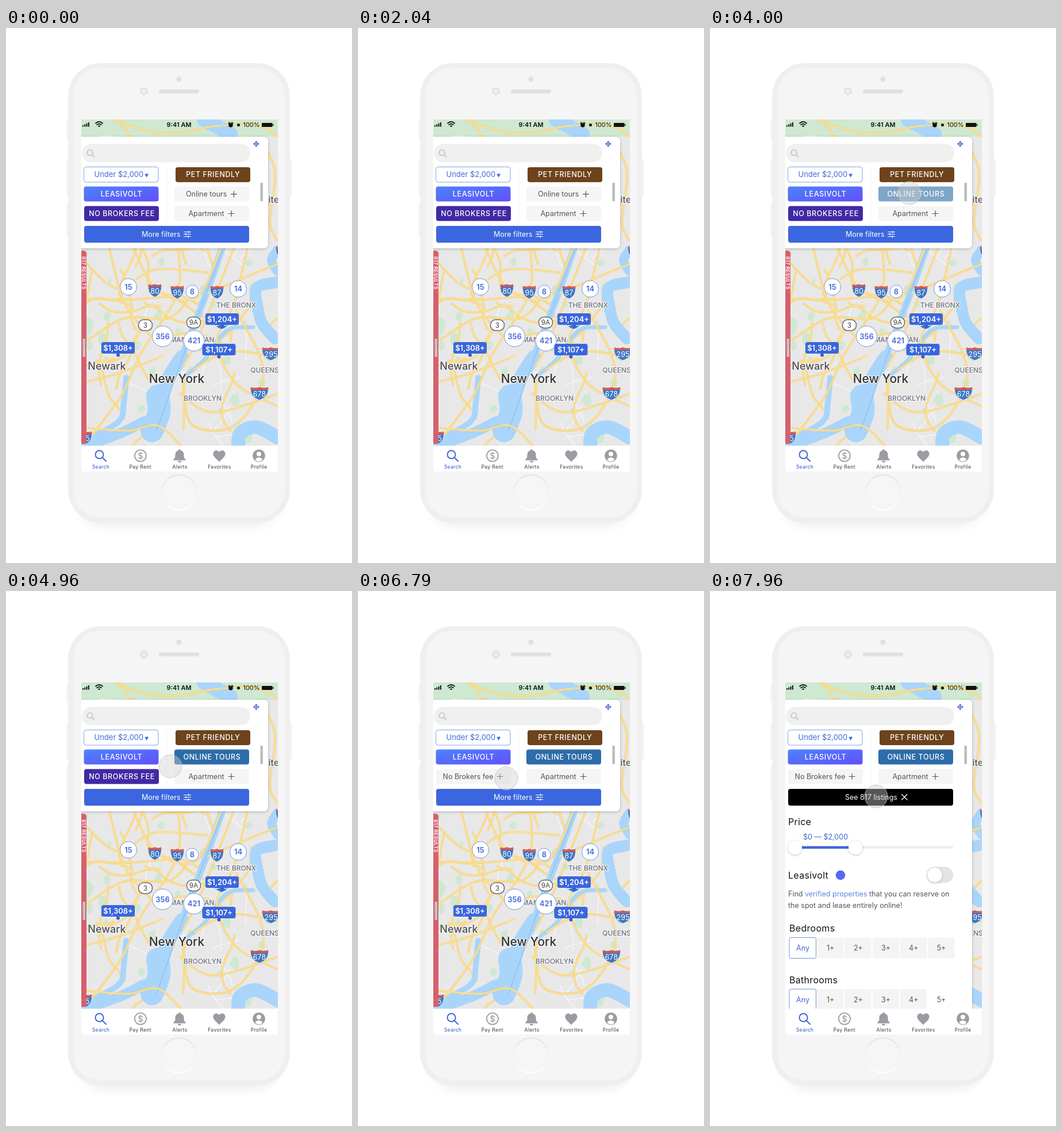
Animation of 602 by 930 pixels, one loop 8 s. Source, as an HTML page:

```html
<!DOCTYPE html>
<html lang="en">
<head>
<meta charset="utf-8">
<title>Rental search</title>
<style>
html, body { margin: 0; width: 100%; height: 100%; overflow: hidden; background: #fff; }
svg { display: block; width: 602px; height: 930px; font-family: Inter, Roboto, sans-serif; }
.mid { text-anchor: middle; }
.caps { font-size: 12.5px; font-weight: 500; letter-spacing: .6px; fill: #fff; }
.body { font-size: 12.5px; fill: #55565a; }
.link { font-size: 12.5px; fill: #4168d8; }
.head { font-size: 16px; letter-spacing: .3px; fill: #151515; }
.place { fill: #697080; font-weight: 500; stroke: #f4f4f4; stroke-width: 2.5px; paint-order: stroke; stroke-linejoin: round; }
.bold { font-size: 13px; font-weight: 600; }
.line { fill: none; stroke-linecap: round; stroke-linejoin: round; }
</style>
</head>
<body>
<svg viewBox="0 0 602 930">
<defs>
  <clipPath id="screen"><rect x="131" y="159" width="342" height="612"/></clipPath>
  <clipPath id="sheet"><rect id="sheetClip" x="131" y="180" width="342" height="203"/></clipPath>
  <filter id="soft" x="-20%" y="-20%" width="140%" height="140%"><feGaussianBlur stdDeviation="9"/></filter>
  <filter id="drop" x="-20%" y="-20%" width="150%" height="150%"><feDropShadow dx="0" dy="1" stdDeviation="2" flood-opacity=".25"/></filter>
  <linearGradient id="violet" x1="0" y1="0" x2="1" y2="1"><stop stop-color="#4c83fb"/><stop offset="1" stop-color="#6150fa"/></linearGradient>
  <linearGradient id="ring" x1="0" y1="0" x2="0" y2="1"><stop stop-color="#e3e3e3"/><stop offset="1" stop-color="#fff"/></linearGradient>
</defs>

<rect x="122" y="90" width="358" height="778" rx="52" opacity=".06" filter="url(#soft)"/>
<g fill="#f5f5f5" stroke="#efefef">
  <rect x="106" y="163" width="6" height="30" rx="2"/>
  <rect x="106" y="229" width="6" height="63" rx="2"/>
  <rect x="106" y="304" width="6" height="60" rx="2"/>
  <rect x="491" y="229" width="6" height="63" rx="2"/>
</g>
<rect x="108" y="61" width="386" height="799" rx="57" fill="#efefef"/>
<rect x="117" y="69" width="368" height="782" rx="48" fill="#f5f5f5"/>
<g fill="#e0e0e0">
  <circle cx="240" cy="110" r="7"/><circle cx="240" cy="110" r="4.5" fill="#ededed"/>
  <circle cx="301" cy="89" r="4.7"/>
  <rect x="266" y="107" width="70" height="6.5" rx="3.2"/>
</g>
<circle cx="301" cy="807.5" r="30.5" fill="#f6f6f6" stroke="url(#ring)" stroke-width="2"/>

<g clip-path="url(#screen)">
  <rect x="131" y="159" width="342" height="612" fill="#e8e8e8"/>
  <path d="M131 159h342v30H131z" fill="#cfe8d1"/>
  <g id="map" class="line"></g>
  <g id="signs"></g>

  <path d="M131 387h4a5 5 0 0 1 5 5v331h-9z" fill="#d6606d"/>
  <rect x="133.5" y="540" width="4.5" height="32" fill="#c2c2c2"/>
  <text transform="translate(132.3 397) rotate(90)" font-size="8.5" font-weight="600" letter-spacing=".35" fill="#fff">817 RESULTS</text>

  <rect id="panel" x="120" y="189" width="336" height="194" rx="8" fill="#fff" filter="url(#drop)"/>
  <rect x="132" y="201.5" width="293" height="32" rx="16" fill="#f0f0f0"/>
  <path d="M149.600 220l4 4M141.200 216.500a4.800 4.800 0 1 0 9.600 0a4.800 4.800 0 1 0-9.600 0" class="line" stroke="#b8b8b8" stroke-width="1.3"/>
  <g id="arrows" class="line" stroke="#4168d8" stroke-width="1.3"></g>
  <rect x="442.500" y="269" width="4.5" height="32" fill="#bdbdbd"/>
  <path d="M279.500 242v94" stroke="#f0f0f0"/>
  <rect x="135.500" y="241.500" width="129.5" height="26.500" rx="4" fill="#fff" stroke="#82a6db"/>
  <text x="153.500" y="259" class="link" style="font-size:13px">Under $2,000</text>
  <path d="M241.500 253.500h6.500l-3.250 6.500z" fill="#4168d8"/>
  <g id="pills"></g>
  <rect x="136" y="344.500" width="287" height="30" rx="4" opacity=".1"/>
  <rect id="more" x="136" y="344" width="287" height="29" rx="4"/>
  <g id="moreText">
    <text x="236" y="362.800" class="body" style="fill:#fff">More filters</text>
    <path d="M309.500 354.500h12M309.500 358.500h12M309.500 362.500h12M318 353v3M313 357v3M317 361v3" class="line" stroke="#fff" stroke-width="1.2"/>
  </g>
  <g id="seeText">
    <text x="235" y="362.800" class="body" style="fill:#fff">See 817 listings</text>
    <path d="M333.500 353.500l9.500 9.500M343 353.500l-9.500 9.500" class="line" stroke="#fff" stroke-width="1.3"/>
  </g>

  <g clip-path="url(#sheet)">
    <text x="136" y="406.800" class="head">Price</text>
    <text x="162" y="431.500" class="link">$0 — $2,000</text>
    <rect x="148" y="443.500" width="275" height="4.500" rx="2" fill="#efefef"/>
    <rect x="148" y="443.500" width="105" height="4.500" fill="#3f68dc"/>
    <g fill="#fff" filter="url(#drop)"><circle cx="148" cy="446" r="12"/><circle cx="253" cy="446" r="12"/></g>
    <text x="136" y="500" class="head">Leasivolt</text>
    <circle cx="227" cy="494" r="8.300" fill="#5369f5"/>
    <rect x="377" y="479.500" width="46" height="28" rx="14" fill="#e4e4e4"/>
    <circle cx="391" cy="493.500" r="12.700" fill="#fff" filter="url(#drop)"/>
    <text x="136" y="530.500" class="body">Find <tspan fill="#5c87e0">verified properties</tspan> that you can reserve on</text>
    <text x="136" y="550.500" class="body">the spot and lease entirely online!</text>
    <g id="rows"></g>
  </g>

  <rect x="131" y="726" width="342" height="45" fill="#fff"/>
  <g class="line" stroke="#3f68dc" stroke-width="2"><circle cx="162.500" cy="741.500" r="7"/><path d="M167.500 746.500l6.500 6.500"/></g>
  <circle cx="234" cy="743.500" r="10" fill="none" stroke="#96989c" stroke-width="1.700"/>
  <text x="234" y="748.500" class="mid" font-size="14" font-weight="500" fill="#96989c">$</text>
  <g fill="#9a9ca1">
    <path d="M302 732.500c1.400 0 2 .8 2 2 4 1 5.500 4 5.500 7.500 0 5 1 6.500 3.500 8.500v1h-22v-1c2.500-2 3.500-3.500 3.500-8.500 0-3.500 1.500-6.500 5.500-7.500 0-1.200.6-2 2-2zM299 752.500h6a3 3 0 0 1-6 0z"/>
    <path d="M371 754l-7.500-7.200c-8-8 1.500-17 7.500-9.800 6-7.200 15.500 1.800 7.500 9.800z"/>
    <circle cx="440" cy="743.500" r="10.800"/>
    <path d="M433.500 750.500c2-5.500 11-5.500 13 0-4 4-9 4-13 0z" fill="#fff"/><circle cx="440" cy="740.500" r="4" fill="#fff"/>
  </g>
  <g id="tabs" class="mid" font-size="8.500" font-weight="500" letter-spacing=".35"></g>

  <g fill="#111">
    <path d="M133 169h2v2.500h-2zM136.300 167.500h2v4h-2zM139.600 165.700h2v5.800h-2zM142.900 164h2v7.500h-2z"/>
    <path d="M156 165.500q6-5 12 0M158.200 168.200q3.800-3.200 7.600 0" class="line" stroke="#111" stroke-width="1.800"/>
    <circle cx="162" cy="170.600" r="1.500"/>
    <text x="301" y="172.200" class="mid" font-size="11" font-weight="600">9:41 AM</text>
    <circle cx="375.500" cy="168.500" r="2.500" fill="#b5d8f8"/>
    <circle cx="391" cy="168.800" r="3.800"/><path d="M387 166l2-2M395 166l-2-2" class="line" stroke="#111" stroke-width="1.600"/>
    <circle cx="404.500" cy="168.500" r="2.600"/>
    <text x="427" y="172.300" class="mid" font-size="11">100%</text>
    <rect x="445" y="165" width="18.500" height="7" rx="1.200"/><rect x="464" y="167" width="1.500" height="3"/>
  </g>
  <circle id="touch" r="20" fill="#d0d0d0" fill-opacity=".42" stroke="#c6c6c6" stroke-opacity=".8"/>
</g>
</svg>
<script>
const $ = id => document.getElementById(id);
const add = (id, html) => $(id).insertAdjacentHTML('beforeend', html);
const text = (x, y, str, attrs) => `<text x="${x}" y="${y}" ${attrs}>${str}</text>`;

// ---- map ----
let seed = 11;
const rand = (a = 0, b = 1) => {
  seed = (seed * 16807) % 2147483647;
  return a + (b - a) * seed / 2147483647;
};
const repeat = (n, fn) => Array.from({ length: n }, (_, i) => fn(i)).join('');

// Smooth curve through the points of "x,y x,y ..."
function curve(str) {
  const p = str.split(' ').map(s => s.split(',').map(Number));
  const at = i => p[Math.max(0, Math.min(p.length - 1, i))];
  const handle = (i, k) => at(i).map((v, a) => (v + k * (at(i + 1)[a] - at(i - 1)[a]) / 6).toFixed(1));
  return 'M' + p[0] + p.slice(1).map((q, i) => `C${handle(i, 1)} ${handle(i + 1, -1)} ${q}`).join('');
}
function wander(steps, stride, bend) {
  let x = rand(131, 473), y = rand(159, 726), dir = rand(0, 6.28);
  return curve(Array.from({ length: steps }, () => {
    dir += rand(-bend, bend);
    x += stride * Math.cos(dir);
    y += stride * Math.sin(dir);
    return `${x.toFixed(1)},${y.toFixed(1)}`;
  }).join(' '));
}
function patch() {
  const x = rand(140, 473), y = rand(385, 720), r = rand(4, 10);
  return 'M' + Array.from({ length: 6 }, (_, i) =>
    [x + r * rand(.6, 1.2) * Math.cos(i * 1.05), y + r * rand(.8, 1.6) * Math.sin(i * 1.05)].map(v => v.toFixed(1))).join('L') + 'z';
}
const stroke = (d, color, width) => add('map', `<path d="${d}" stroke="${color}" stroke-width="${width}"/>`);
const road = d => { stroke(d, '#f5cb6c', 3.5); stroke(d, '#fde295', 2.1); };
const river = (width, pts) => stroke(curve(pts), '#a9d5fb', width);

add('map', `<path d="${repeat(30, patch)}" fill="#cfe8d1"/>`);
stroke(repeat(28, () => wander(4, 16, .3)), '#f6f6f6', 1.6);
road(repeat(34, () => wander(6, 22, .5)));

river(12, '376,383 352,452 326,520 306,572');
river(24, '306,572 284,606 272,640');
river(40, '264,640 266,668 254,700');
river(10, '209,608 205,650 196,684 140,716');
river(18, '240,684 200,704 140,726');
river(7, '310,606 346,576 384,526 430,520');
river(16, '473,385 462,404 473,424');
river(20, '470,442 436,452 438,486 446,514 468,540');
river(24, '404,726 408,704 436,694 473,712');
river(26, '345,159 390,184');
stroke('M376 388L318 542 262 700', '#86b6df', 1);

road([
  '140,410 194,452 260,420 350,425',
  '180,383 208,482 262,545',
  '140,471 222,472 298,466 331,479',
  '222,383 262,455 330,470 374,383',
  '300,383 297,464 235,565 200,640 140,720',
  '140,545 205,505 280,505 313,479',
  '140,615 200,599 272,570',
  '396,383 367,458 331,545 309,587',
  '473,410 405,438 351,461',
  '420,383 397,478 367,545 400,618 473,658',
  '328,593 390,562 473,574',
  '309,620 324,690 399,690 448,600 401,491',
  '302,636 362,668 473,636',
  '140,695 213,700 264,691 304,726',
  '190,160 250,180 310,181 361,171 434,168 473,188',
  '441,189 468,250 459,337 473,370'
].map(curve).join(''));

[['THE BRONX', 400.5, 486], ['MANHATTAN', 324, 546], ['BROOKLYN', 342, 647.5], ['QUEENS', 450, 599]]
  .forEach(([s, x, y]) => add('signs', text(x, y, s, 'class="place mid" font-size="12"')));
add('signs', text(453, 304, 'White', 'class="place mid" font-size="16" style="fill:#555"'));
add('signs', text(175.5, 594, 'Newark', 'class="place mid" font-size="18" style="fill:#4c4d51"'));
add('signs', text(297, 617, 'New York', 'class="place mid" font-size="21" style="fill:#333"'));

function shield(x, y, n) {
  const w = n > 99 ? 15 : 11, top = `M${-w} -11q${w / 2} 3 ${w} 0q${w / 2} 3 ${w} 0`;
  add('signs', `<g transform="translate(${x} ${y})">
    <path d="${top}q3 17 ${-w} 23q${-w - 3} -6 ${-w} -23z" fill="#3e76c4" stroke="#fff" stroke-width=".8"/>
    <path d="${top}l.5 5h${-2 * w - 1}z" fill="#d65a50"/>
    ${text(0, 6, n, 'class="mid" font-size="12.500" fill="#fff"')}</g>`);
}
[[259, 456, 80], [298, 459, 95], [367, 459, 87], [375, 512, 278], [461, 566, 295], [441, 635, 678], [138, 712, 95], [481, 390, 95]]
  .forEach(s => shield(...s));
[[242.5, 516.5, '3'], [326.5, 512, '9A']].forEach(([x, y, s]) => add('signs',
  `<rect x="${x - 12}" y="${y - 9.5}" width="24" height="19" rx="9" fill="#fff" stroke="#66696e" stroke-width="1.500"/>` +
  text(x, y + 4.3, s, 'class="mid" font-size="12" fill="#444"')));
[[213, 450, 15], [324, 458, 8], [404, 453.5, 14], [272.5, 536, 356], [327, 543.5, 421]].forEach(([x, y, n]) => add('signs',
  `<circle cx="${x}" cy="${y}" r="${7.5 + 3.5 * String(n).length}" fill="#fff" stroke="#7096e6"/>` +
  text(x, y + 4.6, n, 'class="mid bold" fill="#3f68dc"')));
[[376, 506, '$1,204+'], [195, 556, '$1,308+'], [370.5, 559, '$1,107+']].forEach(([x, y, s]) => add('signs',
  `<circle cx="${x}" cy="${y + 12.5}" r="3" fill="#355fc9"/><rect x="${x - 29}" y="${y - 10}" width="58" height="20" rx="3.500" fill="#3a66dc"/>` +
  text(x, y + 4.6, s, 'class="mid bold" fill="#fff"')));

// ---- panel ----
for (let a = 0; a < 360; a += 90) add('arrows', `<path d="M0 0v-4.500M-1.600 -2.900l1.600-1.600 1.600 1.600" transform="translate(435.300 201.500) rotate(${a})"/>`);

const box = (id, x, y, fill) => add('pills', `<rect id="${id}" x="${x}" y="${y}" width="130" height="26" rx="4" fill="${fill}"/>`);
const plain = (id, x, plus, y, s) => add('pills', `<g id="${id}">${text(x, y, s, 'class="body"')}
  <path d="M${plus - 5} ${y - 4.5}h10m-5-5v10" class="line" stroke="#55565a" stroke-width="1.200"/></g>`);
const caps = (id, x, y, s) => add('pills', text(x, y, s, `id="${id}" class="caps mid"`));
box('pet', 295, 242, '#6d431c');
caps('petOn', 360.3, 259.3, 'PET FRIENDLY');
box('quick', 135.5, 275.5, 'url(#violet)');
caps('quickOn', 201, 293, 'LEASIVOLT');
box('tours', 293, 275.5, '');
plain('toursOff', 313, 396.5, 293.3, 'Online tours');
caps('toursOn', 358.5, 293, 'ONLINE TOURS');
box('fee', 136, 309.5, '');
plain('feeOff', 147.5, 247, 327, 'No Brokers fee');
caps('feeOn', 201.5, 327, 'NO BROKERS FEE');
box('flat', 293, 309.5, '#f5f5f5');
plain('flatOff', 317.5, 392, 327, 'Apartment');

['Bedrooms', 'Bathrooms'].forEach((title, row) => {
  const y = 602 + row * 89.5;
  add('rows', text(138, y - 10, title, 'class="head"'));
  ['Any', '1+', '2+', '3+', '4+', '5+'].forEach((s, i) => {
    const x = 138 + i * 48.2;
    const look = i ? 'fill="#f4f4f4"' : 'fill="#fff" stroke="#6c8fd8" rx="3"';
    if (!row || i < 5) add('rows', `<rect x="${x}" y="${y + .5}" width="46.500" height="36" ${look}/>`);
    add('rows', text(x + 23.5, y + 23, s, `class="${i ? 'body' : 'link'} mid"`));
  });
});
['Search', 'Pay Rent', 'Alerts', 'Favorites', 'Profile']
  .forEach((s, i) => add('tabs', text(165 + 68.8 * i, 765.8, s, `fill="${i ? '#55575c' : '#3f68dc'}"`)));

// ---- motion ----
const LOOP = 8000, SHOW = 2120, TOURS = 3825, FEE = 5655, MORE = 7520;
const span = (t, from, len) => Math.min(1, Math.max(0, (t - from) / len));
const lerp = (a, b, u) => a + (b - a) * u;
const ease = u => u * u * (3 - 2 * u);
const mix = (a, b, u) => `rgb(${a.map((v, i) => Math.round(lerp(v, b[i], u)))})`;
const show = (id, on) => $(id).style.display = on ? '' : 'none';
const GREY = [245, 245, 245];

// Each move bends towards a middle point.
const MOVES = [
  { from: SHOW, a: [325, 420], via: [336, 354], b: [347, 287] },
  { from: 4400, a: [347, 287], via: [288, 304], b: [228, 322] },
  { from: 6314, a: [228, 322], via: [270, 318], b: [289, 357] }
];
function finger(t) {
  const { from, a, via, b } = MOVES.findLast(m => t >= m.from) || MOVES[0];
  const u = ease(span(t, from, 1100));
  return a.map((v, i) => lerp(lerp(v, via[i], u), lerp(via[i], b[i], u), u));
}

function draw(t) {
  $('touch').setAttribute('transform', `translate(${finger(t)})`);
  $('touch').setAttribute('opacity', span(t, SHOW, 250));

  $('tours').setAttribute('fill', mix(GREY, [44, 108, 168], span(t, TOURS, 300)));
  show('toursOff', t < TOURS);
  show('toursOn', t >= TOURS);
  $('fee').setAttribute('fill', mix([64, 41, 165], GREY, span(t, FEE, 300)));
  show('feeOn', t < FEE);
  show('feeOff', t >= FEE);

  $('more').setAttribute('fill', mix([60, 102, 223], [0, 0, 0], span(t, MORE, 200)));
  show('moreText', t < MORE);
  show('seeText', t >= MORE);
  const h = lerp(194, 580, ease(span(t, MORE, 380)));
  $('panel').setAttribute('height', h);
  $('sheetClip').setAttribute('height', h + 9);
}

const start = performance.now();
function tick() {
  draw((performance.now() - start) % LOOP);
  requestAnimationFrame(tick);
}
tick();
</script>
</body>
</html>
```
